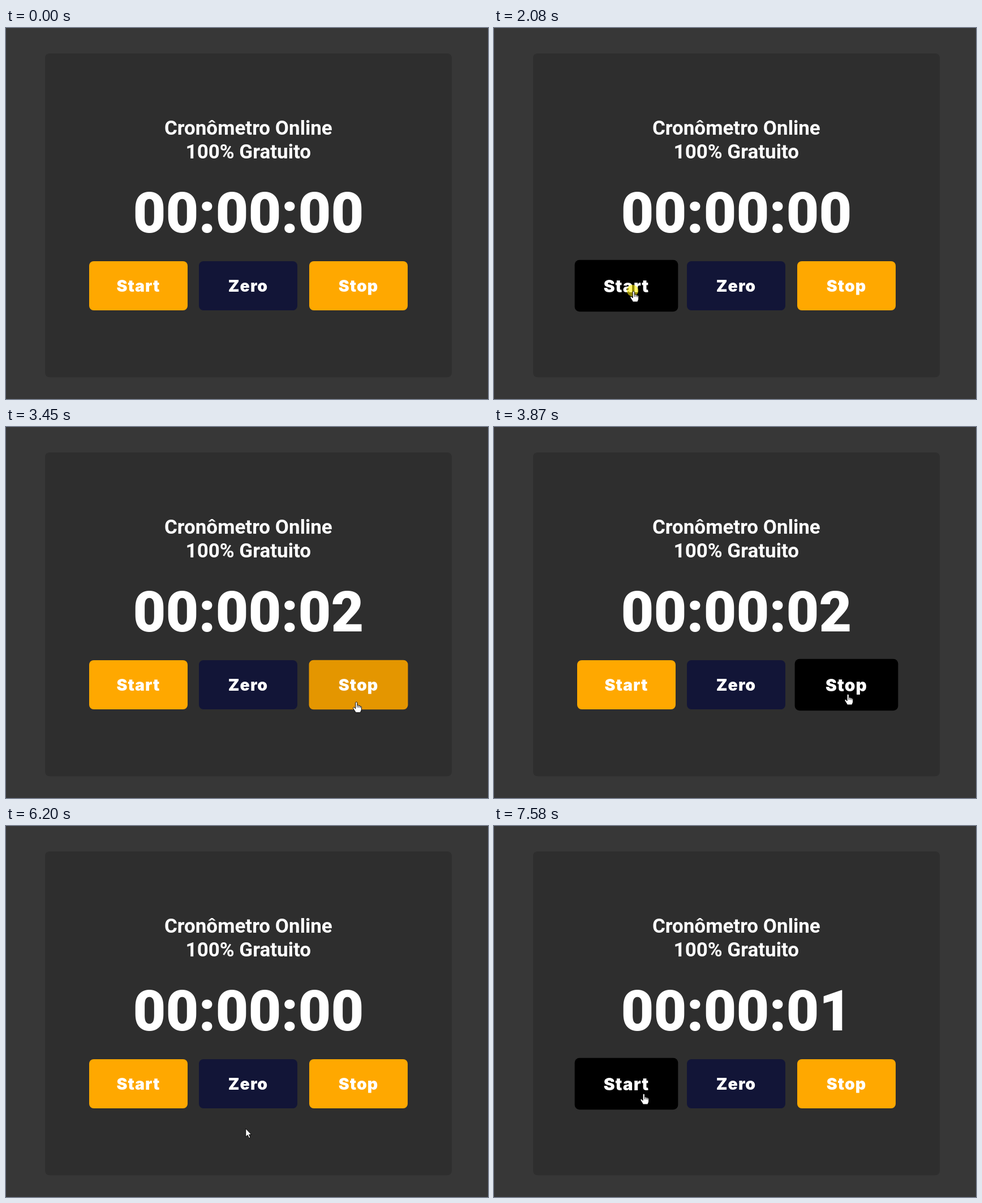
An HTML page that plays this animation: 852 px wide and 657 px high, repeating every 8000 ms.

```html
<!DOCTYPE html>
<html lang="pt-BR">
<head>
<meta charset="utf-8">
<title>Cronômetro Online</title>
<style>
  html, body { margin: 0; width: 100%; height: 100%; overflow: hidden; background: #373737; }
  svg { display: block; width: 852px; height: 657px; }
  text { fill: #fff; text-anchor: middle; }
  .title { font: 600 35px Roboto, sans-serif; }
  .clock { font: 800 100px Roboto, sans-serif; }
  .label { font: 900 28.5px Inter, sans-serif; font-optical-sizing: none; letter-spacing: 1px; }
  .pointer { fill: #fff; stroke: #000; stroke-width: 1; stroke-linejoin: round; }
</style>
</head>
<body>
<svg viewBox="0 0 852 657">
  <rect width="852" height="657" fill="#373737"/>
  <rect x="69" y="45" width="719" height="573.5" rx="8" fill="#2e2e2e"/>
  <text class="title" x="428.3" y="189">Cronômetro Online</text>
  <text class="title" x="428.3" y="231">100% Gratuito</text>
  <text class="clock" id="clock" x="428.5" y="362">00:00:00</text>
  <g id="buttons"></g>
  <circle id="spot" r="10.3" fill="#ffee00" fill-opacity=".58"/>
  <g id="cursor">
    <path id="arrow" class="pointer" d="M.5 .5V15.2L3.9 12L6.3 17.4L8.7 16.4L6.4 11.1H10.6Z"/>
    <g id="hand" transform="translate(.7 1)">
      <path class="pointer" d="M-1.6 12V1.9C-1.6 -.3 1.6 -.3 1.6 1.9V6.6C2.2 5.4 4.3 5.7 4.4 7.2C5.2 6.3 6.8 6.7 7 8.1C7.8 7.5 9 8 9 9.4V13C9 16 7.4 16.6 7.2 19H-1.4C-1.8 16.6 -4.2 14.6 -5.6 11.6C-6.4 9.6 -4 9 -3.1 10.2Z"/>
      <path d="M1.6 6.6V10M4.4 7.2V10.3M7 8.1V10.6" fill="none" stroke="#000" stroke-width=".9"/>
    </g>
  </g>
</svg>
<script>
const LOOP = 8000, FLASH = 70, SECOND = 1000;
const $ = id => document.getElementById(id);
const clamp = v => Math.min(1, Math.max(0, v));
const mix = (a, b, k) => a + (b - a) * k;
const smooth = u => u * u * (3 - 2 * u);
const out = u => 1 - (1 - u) ** 3;

// Moments of the pointer's presses
const press = { start: 2080, stop: 4070, zero: 5795, again: 7505 };

// Pointer moves between rests; each dips by `sag`, `lag` delays x against y
const entry = { at: 450, x: 437, y: 615 };
const moves = [
  { at: 450, dur: 1100, x: 246, y: 465, sag: 0, round: 1, lag: 1, ease: out },
  { at: 2380, dur: 1160, x: 625, y: 472, sag: 54, round: .5, lag: 1, ease: smooth },
  { at: 4590, dur: 990, x: 430, y: 468, sag: 82, round: 1, lag: 1, ease: smooth },
  { at: 6125, dur: 1050, x: 264, y: 473, sag: 103, round: 1, lag: 2, ease: out }
];

const W = 174, H = 87, MID = 456.5;
const ORANGE = [255, 168, 0], NAVY = [18, 21, 55];
const buttons = [
  { text: 'Start', rgb: ORANGE, grow: .05, fade: 400, hover: [[850, 2610], [6780, LOOP]] },
  { text: 'Zero', rgb: NAVY, grow: .08, fade: 1, hover: [[5390, 6150]] },
  { text: 'Stop', rgb: ORANGE, grow: .05, fade: 400, hover: [[3410, 4770]] }
];

buttons.forEach((b, i) => {
  b.x = Math.round(428.25 + 194.5 * (i - 1));
  $('buttons').insertAdjacentHTML('beforeend',
    `<g><rect x="${-W / 2}" y="${-H / 2}" width="${W}" height="${H}" rx="8"/>` +
    `<text class="label" y="10.6">${b.text}</text></g>`);
  b.node = $('buttons').lastElementChild;
});

function pointerAt(t) {
  let { x, y } = entry;
  for (const m of moves) {
    if (t < m.at) break;
    const s = m.ease(clamp((t - m.at) / m.dur));
    x = mix(x, m.x, s ** m.lag);
    y = mix(y, m.y, s) + m.sag * (4 * s * (1 - s)) ** m.round;
  }
  return [x, y];
}

function secondsAt(t) {
  const shown = t - FLASH;
  if (shown >= press.again) return 1;
  if (shown >= press.zero || shown < press.start) return 0;
  return 1 + Math.floor((Math.min(shown, press.stop - FLASH) - press.start) / SECOND);
}

const fade = x => smooth(clamp(x) ** .7);
const isOver = (b, t) => b.hover.some(([on, off]) => t >= on && t < off);
const hoverAmount = (b, t) => b.hover.reduce((sum, [on, off]) =>
  sum + fade((t - on) / b.fade) - fade((t - off) / b.fade), 0);

const show = (node, on) => node.setAttribute('visibility', on ? 'visible' : 'hidden');

function draw(t) {
  for (const b of buttons) {
    const p = clamp(hoverAmount(b, t));
    b.node.setAttribute('transform', `translate(${b.x} ${MID}) scale(${1 + b.grow * p})`);
    b.node.firstChild.setAttribute('fill', `rgb(${b.rgb.map(c => Math.round(c * (1 - p)))})`);
  }

  $('clock').textContent = '00:00:0' + secondsAt(t);

  const [x, y] = pointerAt(t);
  const visible = t >= entry.at;
  const over = buttons.some(b => isOver(b, t));
  $('cursor').setAttribute('transform', `translate(${x} ${y})`);
  show($('arrow'), visible && !over);
  show($('hand'), visible && over);

  $('spot').setAttribute('cx', x - 1);
  $('spot').setAttribute('cy', y);
  show($('spot'), Object.values(press).some(at => t >= at && t < at + FLASH));
}

const begin = performance.now();
function frame() {
  draw((performance.now() - begin) % LOOP);
  requestAnimationFrame(frame);
}
frame();
</script>
</body>
</html>
```
